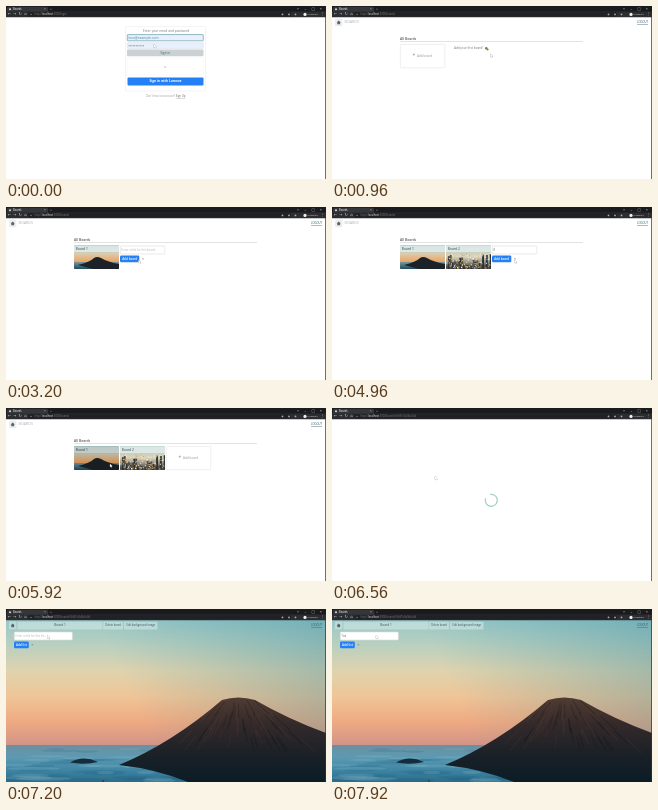
Write an HTML page with a canvas that moves like this. It is 320 by 173 pixels and loops after 8 s.

```html
<!DOCTYPE html>
<html lang="en">
<head>
<meta charset="utf-8">
<title>Boards</title>
<style>
html, body { margin: 0; width: 100%; height: 100%; overflow: hidden; background: #fff; }
canvas { display: block; width: 320px; height: 173px; }
</style>
</head>
<body>
<canvas id="stage" width="320" height="173"></canvas>
<script>
const g = document.getElementById('stage').getContext('2d');
const LOOP = 8000;
const BLUE = '#2580f5';
const GLASS = 'rgba(215,235,232,.55)';

// Mouse moves: start time, x, y; each takes MOVE ms
const MOVE = 300;
const MOVES = [
  [-MOVE, 148, 38.5], [200, 158.5, 48], [1220, 90, 49], [2320, 79, 52], [2880, 132.5, 53],
  [3960, 124, 52], [4440, 182.5, 53], [5400, 104, 56], [6260, 103, 68.5],
  [6640, 20, 27], [6960, 44, 26.5]
];

function rect(x, y, w, h, fill, line, r = 0) {
  g.beginPath();
  g.roundRect(x, y, w, h, r);
  if (fill) { g.fillStyle = fill; g.fill(); }
  if (line) { g.strokeStyle = line; g.lineWidth = 0.6; g.stroke(); }
}

function disc(x, y, r, fill) {
  g.fillStyle = fill;
  g.beginPath();
  g.arc(x, y, r, 0, 7);
  g.fill();
}

function shape(d, fill) {
  g.fillStyle = fill;
  g.fill(new Path2D(d));
}

function text(s, x, y, size, color, align = 'left', weight = 400) {
  g.font = `${weight} ${size}px "Open Sans", "DejaVu Sans", sans-serif`;
  g.textAlign = align;
  g.textBaseline = 'middle';
  g.fillStyle = color;
  g.fillText(s, x, y);
  return g.measureText(s).width;
}

// Vertical gradient with evenly spaced colours
function fade(y0, y1, ...colors) {
  const f = g.createLinearGradient(0, y0, 0, y1);
  colors.forEach((c, i) => f.addColorStop(i / (colors.length - 1), c));
  return f;
}

function random(seed) {
  return () => (seed = seed * 16807 % 2147483647) / 2147483647;
}

const typed = (s, t, start, step) =>
  s.slice(0, Math.max(0, Math.floor((t - start) / step) + 1));

function browser(page) {
  rect(0, 0, 320, 6, '#1a1b1e');
  rect(1, 0.8, 41, 6, '#35363a', null, 1.5);
  rect(0, 5.5, 320, 5.7, '#2c2d30');
  rect(22, 6.2, 263, 4.2, '#202124', null, 2);
  disc(4, 3.2, 1, '#ddd');
  text('Boards', 7, 3.2, 2.6, '#fff');
  text('×', 38.8, 3.2, 3, '#ccc', 'center');
  text('+', 45, 3.2, 3.5, '#aaa', 'center');
  disc(292, 2.7, 0.8, '#777');
  ['–', '□', '×'].forEach((c, i) => text(c, 299.5 + i * 7.7, 2.7, 3.6, '#ddd', 'center'));
  ['←', '→', '↻', '⌂'].forEach((c, i) => text(c, 3.5 + i * 5.3, 8.2, 4, '#ccc', 'center'));
  disc(25, 8.4, 0.7, '#888');
  let x = 28.5;
  x += text('http://', x, 8.4, 2.6, '#777');
  x += text('localhost', x, 8.4, 2.6, '#eee');
  text(':3000/' + page, x, 8.4, 2.6, '#777');
  for (let i = 0; i < 3; i++) disc(276.5 + i * 6.5, 8.4, 0.9, '#aaa');
  disc(299, 8.4, 1.6, '#eee');
  text('Incognito', 301.5, 8.4, 2.4, '#ddd');
  text('⋮', 316.5, 8.4, 4, '#ddd', 'center');
}

function login(t) {
  rect(119.5, 20.5, 80, 64.5, '#fff', '#ececec', 1);
  text('Enter your email and password', 160, 25, 3.2, '#777', 'center');
  rect(121.3, 28.6, 76, 6.2, '#e8f0fe', '#4f8f9d', 0.6);
  text('lena@example.com', 122.5, 31.8, 3.3, '#3c8f96');
  rect(121.3, 36.7, 76, 5.8, '#e8f0fe', '#dde3ea', 0.6);
  for (let i = 0; i < 11; i++) disc(123 + i * 1.45, 39.8, 0.5, '#777');
  rect(121, 43.6, 76.5, 6.6, t >= 560 ? '#b8bfc1' : '#cbd0d2', null, 0.8);
  text('Sign in', 159.3, 46.9, 3.3, '#3d7377', 'center');
  rect(121, 52, 76.5, 17, null, '#f5f5f5');
  text('or', 159.3, 61, 2.8, '#aaa', 'center');
  rect(121.5, 71.4, 76, 8.2, BLUE, null, 1);
  text('Sign in with Lumeva', 159.5, 75.5, 3.2, '#fff', 'center', 700);
  const w = text("Don't have an account? ", 140, 90.5, 2.7, '#999');
  const u = text('Sign Up', 140 + w, 90.5, 2.7, '#666');
  rect(140 + w, 92, u, 0.3, '#888');
}

function spinner(t) {
  const a = (t - 6560) / 1000 * 2 * Math.PI;
  g.beginPath();
  g.arc(159.3, 92.3, 6, a - 1.75, a + 3.5);
  g.strokeStyle = '#9fcfc9';
  g.lineWidth = 1.2;
  g.stroke();
}

function header(fill) {
  rect(3, 12.5, 7.4, 7.8, fill, null, 0.8);
  shape('M4.6 16.5l2.1-2 2.1 2h-.7v1.8h-2.8v-1.8z', '#56686c');
  const w = text('LOGOUT', 316, 16.4, 2.7, '#2f5965', 'right');
  rect(316 - w, 18, w, 0.4, '#2f5965');
}

function form(x, y, w, value, hint, label, labelW) {
  rect(x + 0.3, y, w, 8, '#fff', '#dcdcdc', 0.8);
  text(value || hint, x + 1.6, y + 4.1, 2.75, value ? '#777' : '#b5b5b5');
  rect(x, y + 9.5, labelW, 6.8, BLUE, null, 1.2);
  text(label, x + labelW / 2, y + 13, 3, '#fff', 'center', 600);
  text('×', x + labelW + 3.7, y + 13, 4, '#666', 'center');
}

function sunset(x, y) {
  rect(x, y, 45, 24, fade(y, y + 17, '#9fc6c8', '#d8cdb2', '#f0a25c'));
  rect(x, y + 17, 45, 7, fade(y + 17, y + 24, '#7799a0', '#1d4a60'));
  shape(`M${x + 4} ${y + 20}Q${x + 16} ${y + 17} ${x + 20} ${y + 13}
    Q${x + 23} ${y + 11} ${x + 27} ${y + 13}Q${x + 34} ${y + 17} ${x + 45} ${y + 19}v5h-26z`, '#1c2228');
}

function city(x, y) {
  const rnd = random(29);
  rect(x, y, 45, 24, fade(y, y + 24, '#b5cccb', '#d9d2bb', '#3a3b3c'));
  for (let i = 0; i < 24; i++) {
    const h = 3 + rnd() * 12;
    rect(x + i * 1.9, y + 24 - h, 1.9, h, i % 2 ? '#2a3236' : '#575149');
  }
  for (let i = 0; i < 110; i++)
    rect(x + rnd() * 44, y + 8 + rnd() * 15, 1, 1, i % 2 ? '#d2a95f' : '#f4eedc');
}

function board(x, name, picture) {
  g.save();
  rect(x, 38, 45, 24, null, null, 1);
  g.clip();
  picture(x, 38);
  rect(x, 38.5, 45, 6.5, 'rgba(228,241,240,.75)');
  text(name, x + 1.8, 41.8, 3.3, '#34484e');
  g.restore();
}

function boards(t) {
  header('#eee');
  text('BOARDS', 12.5, 16.5, 3.7, '#b0b0b0');
  text('All Boards', 68, 32.7, 3.35, '#555', 'left', 600);
  rect(68, 35.4, 183, 0.6, '#c8c8c8');
  const count = (t >= 2880) + (t >= 4480);
  if (count > 0) board(68, 'Board 1', sunset);
  if (count > 1) board(114, 'Board 2', city);
  if (t >= 5680) rect(68, 38, 45, 24, 'rgba(0,0,0,.12)', null, 1);
  const x = 68 + count * 46;
  if (t >= 1520 && t < 5280) {
    const value = typed(['Board 1', 'Board 2', 'B'][count], t, [1920, 3440, 4960][count], 85);
    form(x, 39, 44.5, value, 'Enter a title for this board...', 'Add board', 19.3);
  } else {
    rect(x + 0.3, 38.3, 44.5, 23.5, '#fff', '#e2e2e2', 1);
    text('+', x + 14, 49.4, 5, '#666', 'center');
    text('Add board', x + 17, 49.7, 3.1, '#999');
  }
  if (!count) {
    text('Add your first board!', 122, 42.6, 3, '#777');
    disc(154.3, 42.2, 1.2, '#5e8a3c');
    disc(155.6, 43.6, 1, '#a9773d');
  }
}

function volcano() {
  rect(0, 11, 320, 128, fade(11, 138, '#98c8c8', '#b9d0bf', '#dfd3ae', '#efc597', '#efaa82', '#cf9288'));
  const dusk = g.createLinearGradient(130, 100, 320, 11);
  dusk.addColorStop(0, 'rgba(60,140,160,0)');
  dusk.addColorStop(1, 'rgba(60,140,160,.4)');
  rect(0, 11, 320, 128, dusk);
  rect(0, 136, 320, 37, fade(136, 173, '#6d8fa0', '#5c9ab2', '#3f86a3', '#2a6d8c'));

  const rnd = random(7);
  for (let i = 0; i < 50; i++) {
    const y = 140 + rnd() * 33;
    g.fillStyle = i % 2 ? 'rgba(150,195,210,.2)' : 'rgba(25,85,120,.18)';
    g.beginPath();
    g.ellipse(rnd() * 200, y, 8 + rnd() * 20, 0.6 + (y - 137) / 24, 0, 0, 7);
    g.fill();
  }
  shape('M64 153.5Q77 146 92 153Q78 156 64 153.5', '#152c3c');

  g.save();
  const slope = new Path2D('M113 156Q166 134 216 91Q232 86 249 91Q282 110 320 124V173H182Q150 160 113 156');
  g.fillStyle = fade(88, 173, '#513c33', '#33292a', '#1b2127', '#0b1c26');
  g.fill(slope);
  g.clip(slope);
  // Gullies fan out below the crater
  g.lineWidth = 1.2;
  for (let i = 0; i < 60; i++) {
    const u = rnd() * 2 - 1, y = 90 + rnd() * 40, k = 14 + (y - 88) * 1.2;
    g.strokeStyle = i % 2 ? 'rgba(5,10,15,.2)' : 'rgba(125,80,55,.13)';
    g.beginPath();
    g.moveTo(232 + u * k, y);
    g.lineTo(232 + u * (k + 16), y + 14);
    g.stroke();
  }
  g.restore();
  disc(97, 172, 1, '#403a3c');
}

function tag(x, w, label, size) {
  rect(x, 12.7, w, 7.7, GLASS, null, 0.6);
  text(label, x + w / 2, 16.6, size, '#3f565b', 'center');
}

function boardPage(t) {
  volcano();
  header(GLASS);
  tag(11.5, 85, 'Board 1', 3.2);
  tag(97.2, 19.8, 'Delete board', 2.6);
  tag(118, 33.5, 'Edit background image', 2.7);
  if (t >= 6960) {
    form(8, 23, 58, typed('Tod', t, 7440, 220), 'Enter a title for this list...', 'Add list', 14.8);
  } else if (t >= 6720) {
    rect(8, 23, 58, 8, 'rgba(255,255,255,.6)', null, 0.8);
    text('+ Add list', 37, 27, 3, '#56696d', 'center');
  }
}

function mouse(t) {
  let x = 0, y = 0;
  for (const [start, toX, toY] of MOVES) {
    const u = Math.min(1, Math.max(0, (t - start) / MOVE));
    const e = u * u * (3 - 2 * u);
    x += (toX - x) * e;
    y += (toY - y) * e;
  }
  const arrow = new Path2D(`M${x} ${y}v3l.8-.6.6 1.1.5-.3-.5-1 .9-.1z`);
  g.strokeStyle = '#777';
  g.lineWidth = 0.4;
  g.stroke(arrow);
  g.fillStyle = '#fff';
  g.fill(arrow);
}

function draw(t) {
  rect(0, 0, 320, 173, '#fff');
  if (t < 800) login(t);
  else if (t < 960 || (t >= 6480 && t < 6640)) spinner(t);
  else if (t < 6480) boards(t);
  else boardPage(t);
  browser(t < 800 ? 'login' : t < 6400 ? 'boards' : 'boards/5fd81c0a9b2e4d');
  rect(319.3, 11, 0.7, 162, '#333');
  mouse(t);
}

let start;
function tick(now) {
  start ??= now;
  draw((now - start) % LOOP);
  requestAnimationFrame(tick);
}
requestAnimationFrame(tick);
</script>
</body>
</html>
```
